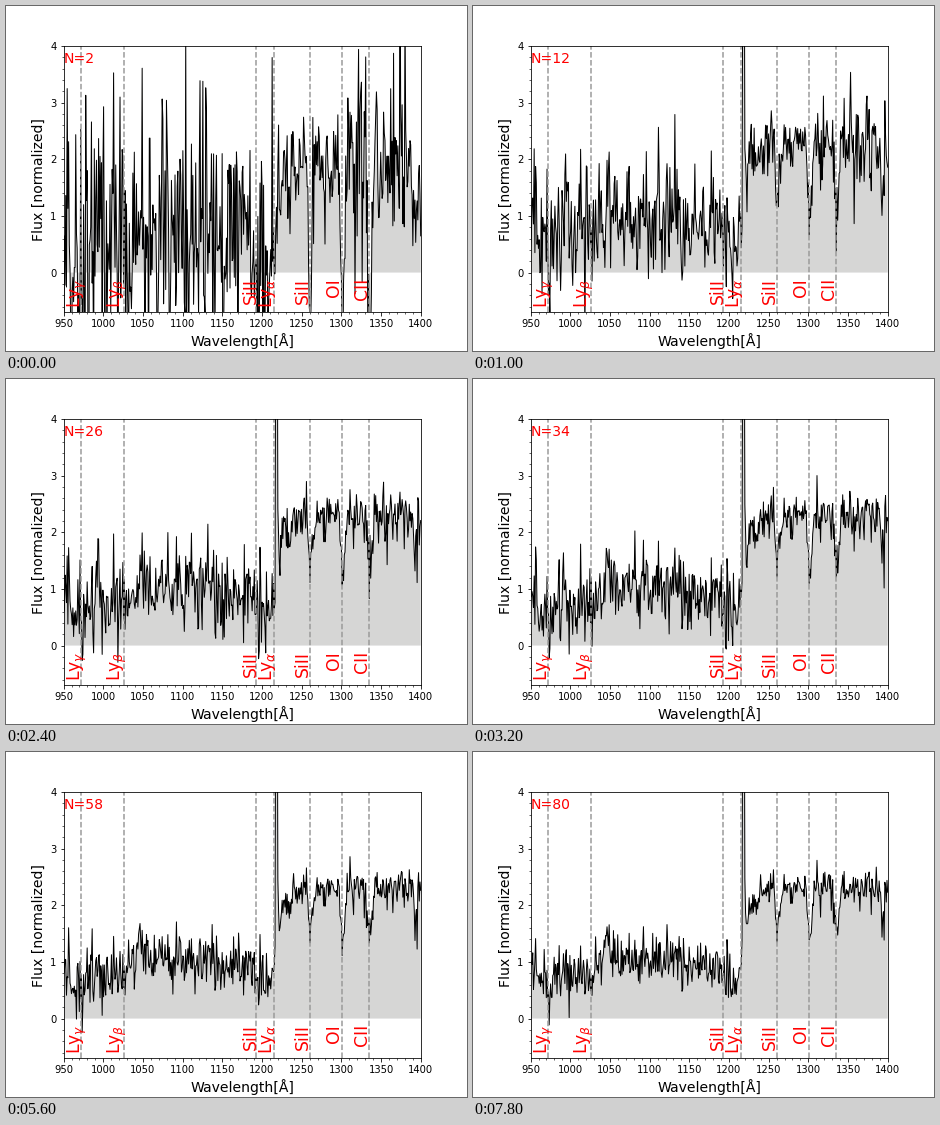
A matplotlib script for the animation above (8 s loop, 461 px wide and 345 px high).

```python
import numpy as np
import matplotlib.pyplot as plt
from matplotlib.animation import FuncAnimation

W, H, DPI = 461, 345, 72
STEPS, INTERVAL = 40, 200
RED, FILL = "red", "#d6d6d5"

# name, wavelength of the dashed line, label baseline, absorption depth
LINES = [
    (r"Ly$_\gamma$", 972.5, 972, .45),
    (r"Ly$_\beta$", 1025.7, 1022.5, .3),
    ("SiII", 1193, 1192.5, .2),
    (r"Ly$_\alpha$", 1215.7, 1212.5, 0),
    ("SiII", 1260.4, 1258, .7),
    ("OI", 1301, 1297, .9),
    ("CII", 1334.5, 1332.5, .8)]

rng = np.random.default_rng(7)
wave = np.arange(950, 1400.1, .9)


def bell(center, width):
    return np.exp(-((wave - center) / width) ** 2 / 2)


def rise(center, width):
    return 1 / (1 + np.exp((center - wave) / width))


# Continuum on both sides of the main emission peak
blue = .78 + .45 * rise(1036, 1.5) * np.exp((1040 - wave) / 150)
blue -= .35 * bell(1208, 5)
red = 2.35 - .75 * np.exp(-np.abs(wave - 1220) / 12)
red -= .75 * bell(1394, 1.5)
mean = np.where(wave < 1216.5, blue, red)
mean += rng.normal(0, .1, wave.size)
dips = sum(depth * bell(x + 1, 2.2) for _, x, _, depth in LINES)
peak = 9 * bell(1218.3, .8)

# Noise of the single spectra, strongest at the blue end
sigma = (.8 + .9 * rise(1215, -5) + np.exp((950 - wave) / 35)
         + .5 * rise(1303, 2))
noise = .75 * rng.standard_t(4, (2 * STEPS, wave.size)) * sigma
total = noise.cumsum(axis=0)


def stack(n):
    """Average of the first n spectra."""
    base = mean * (1 - .4 / n) - dips * (1 + 5 / n)
    return base + total[n - 1] / n + peak * min(1, (n - 2) / 4)


fig = plt.figure(figsize=(W / DPI, H / DPI), dpi=DPI)
ax = fig.add_axes([57.6 / W, 38.8 / H, 357.1 / W, 266.1 / H])
ax.set_xlim(950, 1400)
ax.set_ylim(-.7, 4)
ax.minorticks_on()
ax.set_xlabel("Wavelength[Å]", fontsize=14)
ax.set_ylabel("Flux [normalized]", fontsize=14)

area, = ax.fill([950, 1400, 1400], [0, 0, 0], color=FILL, lw=0)
curve, = ax.plot([], [], color="black", lw=1)
for name, x, base, _ in LINES:
    ax.axvline(x, color="0.6", ls="--", lw=1.5)
    ax.text(base, -.1, name, color=RED, fontsize=17.3, rotation=90,
            rotation_mode="anchor", ha="right", va="baseline")
label = ax.text(950, 3.7, "", color=RED, fontsize=14)


def update(i):
    n = 2 * i + 2
    flux = stack(n)
    curve.set_data(wave, flux)
    area.set_xy(np.column_stack([np.r_[950, wave, 1400], np.r_[0, flux, 0]]))
    label.set_text(f"N={n}")
    return area, curve, label


anim = FuncAnimation(fig, update, frames=STEPS, interval=INTERVAL,
                     repeat=True, repeat_delay=0)
plt.show()
```
